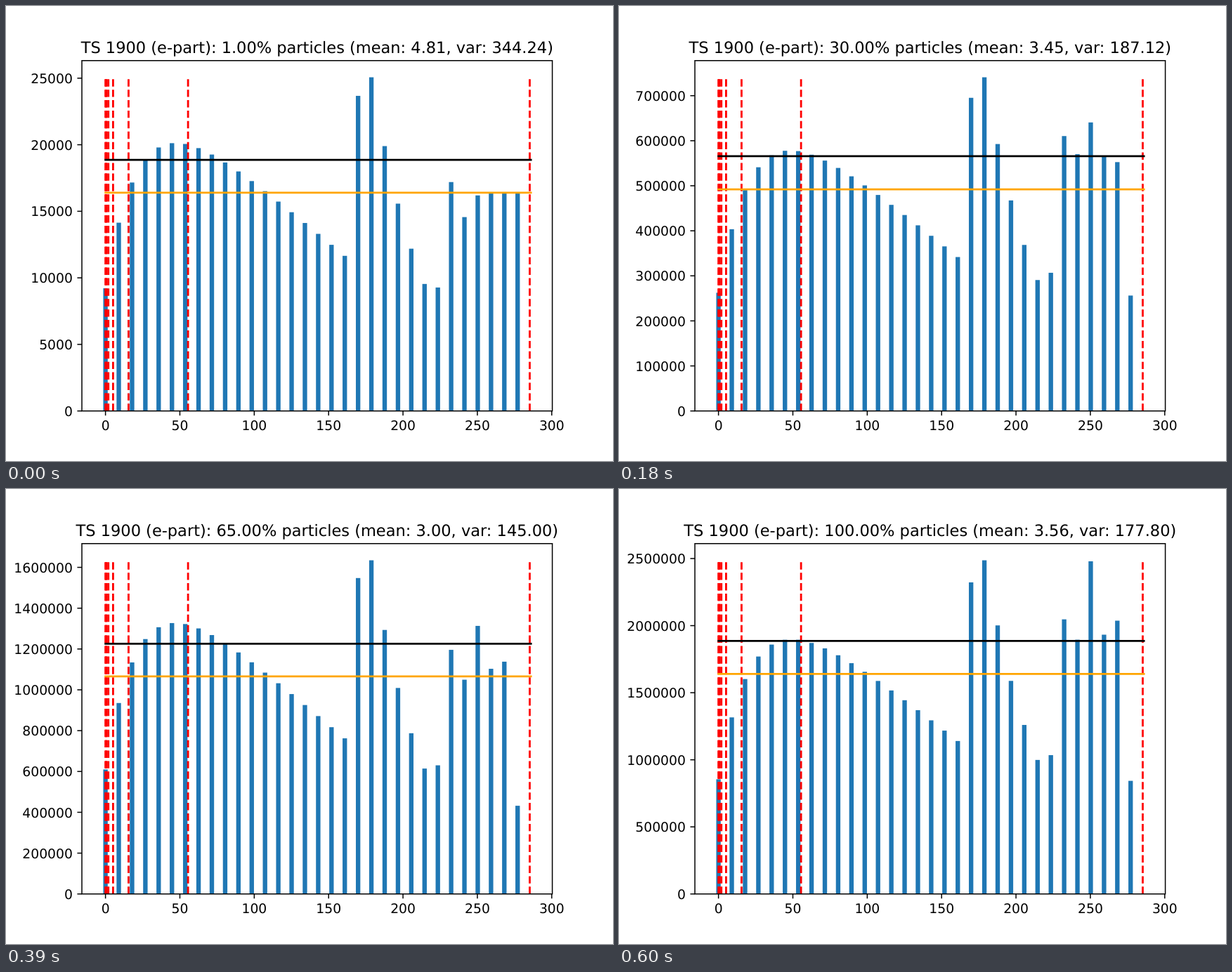
Recreate the animation shown at these times as an HTML page with a canvas. Size 864x648 px, loop 630 ms.

```html
<!DOCTYPE html>
<html lang="en">
<head>
<meta charset="utf-8">
<title>Particle histogram</title>
<style>
  html, body { margin: 0; width: 100%; height: 100%; overflow: hidden; background: #fff; }
  canvas { display: block; }
</style>
</head>
<body>
<canvas id="chart" width="864" height="648"></canvas>
<script>
const ctx = document.getElementById('chart').getContext('2d');
const STEP_MS = 30, STEPS = 21, BARS = 32;

// Plot area and x scale
const LEFT = 108, RIGHT = 777.6, TOP = 77.76, BOTTOM = 576.72;
const X_MAX = 286, BAR_W = 3;
const X_SCALE = (RIGHT - LEFT) / ((X_MAX + BAR_W / 2) * 1.1);
const X_ZERO = LEFT + ((X_MAX + BAR_W / 2) * 0.05 + BAR_W / 2) * X_SCALE;
const LINE = 2.8125, THIN = 1.5, TICK = 6.56, PAD = 13.125;
const MARKS = [0, 0.3, 0.8, 1.95, 5.1, 15.5, 55.5, 285.2];

const KEYS = [
  { pct: 1, peak: 25067, mean: 4.81, vari: 344.24 },
  { pct: 20, peak: 494600, mean: 3.87, vari: 226.51 },
  { pct: 40, peak: 987100, mean: 3.24, vari: 167.43 },
  { pct: 55, peak: 1378800, mean: 2.99, vari: 145.80 },
  { pct: 75, peak: 1890400, mean: 3.00, vari: 144.42 },
  { pct: 85, peak: 2121000, mean: 3.30, vari: 159.87 },
  { pct: 100, peak: 2487000, mean: 3.56, vari: 177.80 }
];

// Right-hand bars relative to the peak at 1, 20, 62 and 100 %
const TAIL_FROM = 25;
const TAIL = [
  [0.37, 0.43, 0.385, 0.416],
  [0.686, 0.875, 0.73, 0.823],
  [0.581, 0.84, 0.64, 0.762],
  [0.646, 0.9, 0.8, 0.997],
  [0.652, 0.812, 0.673, 0.777],
  [0.652, 0.774, 0.694, 0.819],
  [0.652, 0.391, 0.263, 0.339]
];
const SKEW = [0.2, 1, 0, 1];

const mix = (a, b, u) => a + (b - a) * u;
const xAt = v => X_ZERO + v * X_SCALE;

// Quick start, slow dip towards 62 %, then recovery
function swing(pct, [open, high, low, end]) {
  if (pct < 20) return mix(open, high, (1 - 1 / pct) / (1 - 1 / 20));
  if (pct < 62) return mix(low, high, ((62 - pct) / 42) ** 1.6);
  return mix(low, end, ((pct - 62) / 38) ** 1.6);
}

// Bar height relative to the peak: a skewed hump, then a sharp decaying one
function share(i, pct) {
  if (i >= TAIL_FROM) return swing(pct, TAIL[i - TAIL_FROM]);
  const base = i < 19
    ? 0.467 + 0.0337 * (18 - i) - 0.7 * 0.667 ** i
    : Math.min(1 + 0.053 * (i - 20), 0.791 * 0.78 ** (i - 21));
  const pull = i < 20 ? 0.08 * (1 - i / 23) : -0.0175 * (i - 20);
  return base * (1 - pull * swing(pct, SKEW));
}

// Totals grow linearly between keys, averages are weighted by share
function stateAt(step) {
  const pct = step ? step * 5 : 1;
  const n = Math.max(1, KEYS.findIndex(k => k.pct >= pct));
  const a = KEYS[n - 1], b = KEYS[n];
  const u = (pct - a.pct) / (b.pct - a.pct);
  const stat = name => mix(a[name] * a.pct, b[name] * b.pct, u) / pct;
  return { pct, peak: mix(a.peak, b.peak, u), mean: stat('mean'), vari: stat('vari') };
}

function tickStep(max) {
  const raw = max / 9, pow = 10 ** Math.floor(Math.log10(raw));
  return [1, 2, 2.5, 5, 10].find(m => m * pow >= raw) * pow;
}

function line(x1, y1, x2, y2, color, width) {
  ctx.strokeStyle = color;
  ctx.lineWidth = width;
  ctx.beginPath();
  ctx.moveTo(x1, y1);
  ctx.lineTo(x2, y2);
  ctx.stroke();
}

function label(text, x, y, align, size = 18.75) {
  ctx.font = size + 'px "DejaVu Sans", sans-serif';
  ctx.textRendering = 'geometricPrecision';
  ctx.textAlign = align;
  ctx.fillStyle = '#000';
  ctx.fillText(text, x, y);
}

function draw(step) {
  const { pct, peak, mean, vari } = stateAt(step);
  const yMax = peak * 1.05;
  const yAt = v => BOTTOM - v / yMax * (BOTTOM - TOP);

  ctx.fillStyle = '#fff';
  ctx.fillRect(0, 0, 864, 648);

  ctx.fillStyle = '#1f77b4';
  for (let i = 0; i < BARS; i++) {
    const y = yAt(share(i, pct) * peak);
    ctx.fillRect(xAt(i * X_MAX / BARS - BAR_W / 2), y, BAR_W * X_SCALE, BOTTOM - y);
  }

  ctx.setLineDash([3.7 * LINE, 1.6 * LINE]);
  for (const m of MARKS) line(xAt(m), BOTTOM, xAt(m), yAt(peak), '#f00', LINE);
  ctx.setLineDash([]);

  ctx.lineCap = 'square';
  for (const [rate, color] of [[18860, '#000'], [16400, '#ffa500']]) {
    const y = yAt(rate * pct);
    line(xAt(0), y, xAt(X_MAX), y, color, LINE);
  }
  ctx.lineCap = 'butt';

  ctx.strokeStyle = '#000';
  ctx.lineWidth = THIN;
  ctx.strokeRect(LEFT, TOP, RIGHT - LEFT, BOTTOM - TOP);

  for (let v = 0; v <= 300; v += 50) {
    line(xAt(v), BOTTOM, xAt(v), BOTTOM + TICK, '#000', THIN);
    label(v, xAt(v), BOTTOM + PAD + 14.4, 'center');
  }
  const gap = tickStep(yMax);
  for (let v = 0; v <= yMax; v += gap) {
    line(LEFT - TICK, yAt(v), LEFT, yAt(v), '#000', THIN);
    label(Math.round(v), LEFT - PAD, yAt(v) + 7.1, 'right');
  }

  label(`TS 1900 (e-part): ${pct.toFixed(2)}% particles (mean: ${mean.toFixed(2)}, var: ${vari.toFixed(2)})`,
    (LEFT + RIGHT) / 2, TOP - 11.25, 'center', 22.5);
}

const start = performance.now();
let shown = -1;
function tick() {
  const step = Math.floor((performance.now() - start) / STEP_MS) % STEPS;
  if (step !== shown) draw(shown = step);
  requestAnimationFrame(tick);
}
tick();
</script>
</body>
</html>
```
